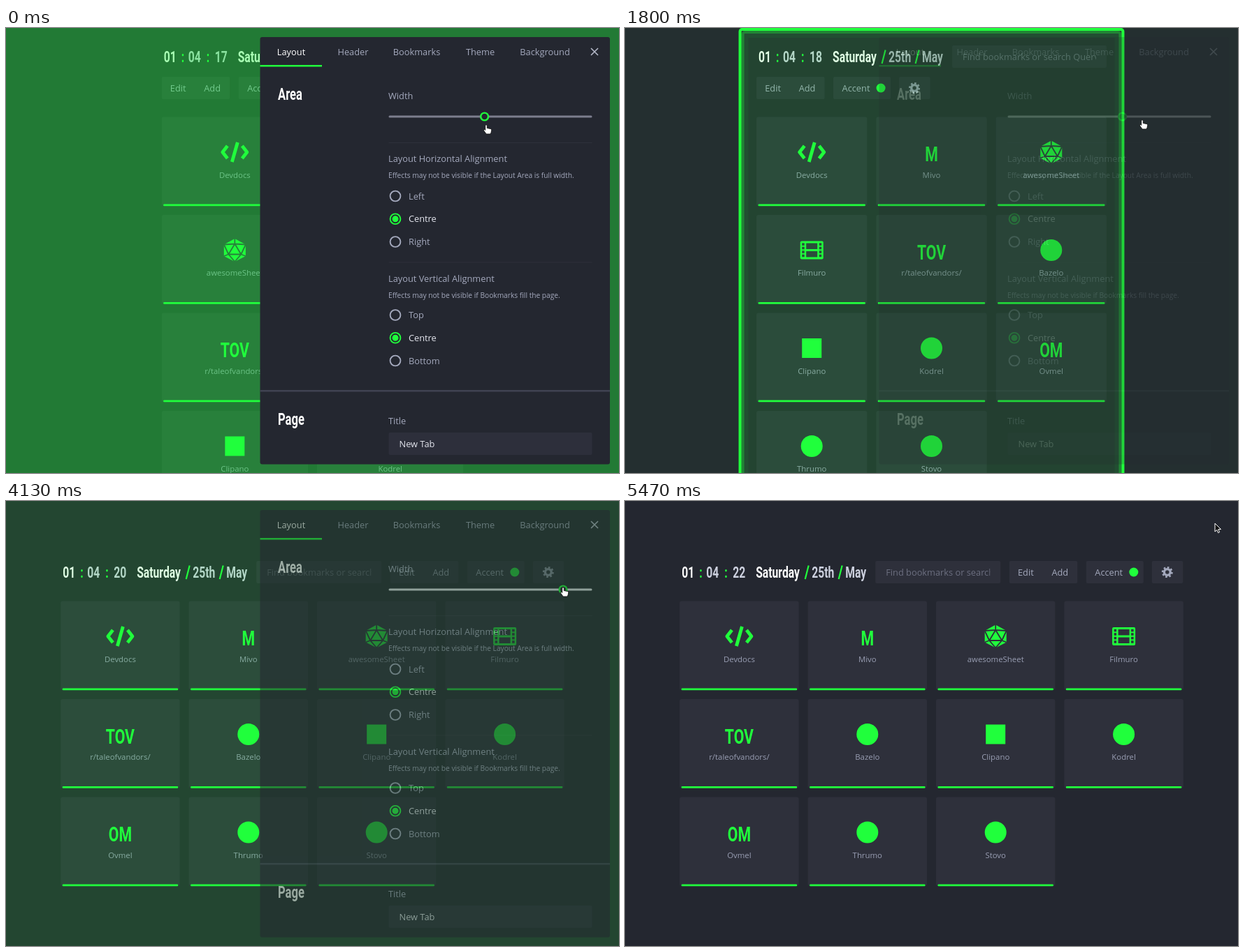
These frames come from a looping animation (877x638 px, 5540 ms). An HTML page:

```html
<!DOCTYPE html>
<html lang="en">
<head>
<meta charset="utf-8">
<title>Layout settings</title>
<style>
  html, body { margin: 0; width: 100%; height: 100%; overflow: hidden; background: #242730; }
  svg { display: block; }
  text { font: 12.8px "Open Sans", sans-serif; fill: #a4a9bd; white-space: pre; }
  .mid { text-anchor: middle; }
  .label { font-size: 11.4px; fill: #999eb3; }
  .small { font-size: 10.2px; }
  .bright { fill: #e4e6ee; }
  .hint { fill: #6c6f80; }
  .display { font: 600 21.8px Roboto, sans-serif; fill: #ccd0de; }
  .heading { font-size: 23px; fill: #fff; }
  .strong { fill: #fff; }
  .accent { fill: #20ff3c; }
  .mono { font-size: 29.5px; text-anchor: middle; fill: #20ff3c; }
</style>
</head>
<body>
<svg id="stage" width="877" height="638" viewBox="0 0 877 638"></svg>
<script>
const W = 877, H = 638, LOOP = 5540, FRAME = 200 / 3;
const ACCENT = '#20ff3c', BASE = '#242730', CARD = '#2e303b';
const stage = document.getElementById('stage');

const rect = (x, y, w, h, fill, rx = 0, extra = '') =>
  `<rect x="${x}" y="${y}" width="${w}" height="${h}" rx="${rx}" fill="${fill}" ${extra}/>`;
const circle = (x, y, r, fill, extra = '') =>
  `<circle cx="${x}" cy="${y}" r="${r}" fill="${fill}" ${extra}/>`;
const path = (d, extra) => `<path d="${d}" ${extra}/>`;
const text = (x, y, str, cls = '') => `<text x="${x}" y="${y}" class="${cls}">${str}</text>`;
// One condensed cut for every heading
const display = (x, y, str, cls = '') =>
  `<text transform="translate(${x} ${y}) scale(.72 1)" class="display ${cls}">${str}</text>`;
const group = (body, opacity) => opacity > 0 ? `<g opacity="${opacity}">${body}</g>` : '';
const at = (x, y, body) => `<g transform="translate(${x} ${y})">${body}</g>`;

const progress = (t, from, to) => Math.min(1, Math.max(0, (t - from) / (to - from)));
const mix = (a, b, k) => a + (b - a) * k;

// Linear interpolation through [time, ...values] rows
function track(rows, t) {
  const next = rows.findIndex(row => row[0] > t);
  if (next < 0) return rows[rows.length - 1].slice(1);
  const a = rows[next - 1], b = rows[next], k = progress(t, a[0], b[0]);
  return a.slice(1).map((v, i) => mix(v, b[i + 1], k));
}

const SLIDER = [[0, 684.6], [1200, 684.6], [1800, 711.5], [2400, 764], [2950, 797]];
const POINTER = [[0, 687, 139], [600, 685, 130], [1200, 685, 129], [1800, 740, 132],
  [2400, 775, 130], [2950, 797, 124], [4250, 797, 124], [4760, 844, 33], [5150, 844, 32]];
const TICKS = [1270, 2150, 3000, 4330, 5440];
const PRESS = 650, RELEASE = 3990, LEAVE = 4300, CLOSE = 5130;

const mono = str => display(0, 13, str, 'mono');
const disc = circle(0, 0, 15.5, ACCENT);
const icons = {
  code: path('M-10.5-9L-17.5 0-10.5 9M10.5-9L17.5 0 10.5 9M4-14L-4 14',
    `fill="none" stroke="${ACCENT}" stroke-width="4.8" stroke-linejoin="round"`),
  die: path('M0-16.5L15.5-8V8.5L0 16.5-15.5 8.5V-8Z', `fill="${ACCENT}"`) +
    path('M0-9L-9 6H9ZM0-17V-9L15.5-8 9 6 15.5 8.5M0-9L-15.5-8-9 6-15.5 8.5M-9 6L0 16.5 9 6',
      `fill="none" stroke="${CARD}" stroke-width="1.8" stroke-linejoin="round"`),
  film: rect(-16.5, -13, 33, 26, ACCENT, 2) + rect(-8, -10, 16, 8.5, CARD) + rect(-8, 1.5, 16, 8.5, CARD) +
    [-10.2, -4.8, .8, 6.2].map(y => rect(-14, y, 3.5, 3.6, CARD) + rect(10.5, y, 3.5, 3.6, CARD)).join('')
};
const BOOKMARKS = [
  ['Devdocs', icons.code], ['Mivo', mono('M')], ['awesomeSheet', icons.die], ['Filmuro', icons.film],
  ['r/taleofvandors/', mono('TOV')], ['Bazelo', disc], ['Clipano', rect(-14, -14, 28, 28, ACCENT)],
  ['Kodrel', disc], ['Ovmel', mono('OM')], ['Thrumo', disc], ['Stovo', disc]
];

function card([name, icon], x, y, w) {
  return at(x, y, rect(0, 0, w, 127.5, CARD, 3) + rect(2.5, 125, w - 5, 2.7, ACCENT, 1) +
    at(w / 2, 50.5, icon) + text(w / 2, 87, name, 'label mid'));
}

function clock(x, y, seconds) {
  const parts = [[3, '01', 'strong'], [28, ':', 'accent'], [38, '04'], [64, ':', 'accent'], [76, seconds],
    [109, 'Saturday', 'strong'], [189, '25th'], [237, 'May']];
  return at(x, y, parts.map(([dx, str, cls]) => display(dx, 0, str, cls)).join('') +
    path('M179.5 2.5L184.5-17M227.5 2.5L232.5-17', `stroke="${ACCENT}" stroke-width="2.2"`));
}

function buttons(x, y) {
  const gear = circle(0, 0, 4.4, 'none', 'stroke="#a4a9bd" stroke-width="3.4"') +
    circle(0, 0, 6.7, 'none', 'stroke="#a4a9bd" stroke-width="2.6" pathLength="16" stroke-dasharray="1"');
  return at(x, y, rect(0, 0, 97.5, 32, CARD, 2) + rect(110, 0, 82, 32, CARD, 2) + rect(204, 0, 44.5, 32, CARD, 2) +
    text(23.5, 20.5, 'Edit', 'mid') + text(72.5, 20.5, 'Add', 'mid') + text(122.5, 20.5, 'Accent') +
    circle(178, 16, 6.5, ACCENT) + at(226, 16, gear));
}

// Returns the page content and the outline of its area
function layout(sliderX, seconds) {
  const width = W * (.15 + .85 * (sliderX - 548) / 290);
  const columns = width < 525 ? 2 : width < 650 ? 3 : 4;
  const oneRow = width > 745;
  const rows = Math.ceil(BOOKMARKS.length / columns);
  const height = 107.5 + (oneRow ? 0 : 45) + rows * 140.5 - 13;
  const left = (W - width) / 2, top = Math.max(0, (H - height) / 2);
  const x = left + 25.5, y = top + 25, inner = width - 51;
  const searchWidth = inner - 280 - (oneRow ? 261.5 : 0);
  const cardTop = y + 57.5 + (oneRow ? 0 : 45);
  const cardWidth = (inner - 13 * (columns - 1)) / columns;

  const search = rect(x + 280, y, searchWidth, 32, CARD, 2) +
    `<svg x="${x + 295}" y="${y}" width="${searchWidth - 30}" height="32">` +
    text(0, 20.5, 'Find bookmarks or search Querva', 'hint') + '</svg>';
  const cards = BOOKMARKS.map((bookmark, i) =>
    card(bookmark, x + i % columns * (cardWidth + 13), cardTop + Math.floor(i / columns) * 140.5, cardWidth));
  const content = clock(x, y + 23.5, seconds) + search +
    (oneRow ? buttons(x + inner - 249, y) : buttons(x, y + 45)) + cards.join('');

  const ring = (inset, size, opacity) => rect(left + inset, top + inset, width - 2 * inset, height - 2 * inset,
    'none', 3, `stroke="${ACCENT}" stroke-width="${size}" stroke-opacity="${opacity}"`);
  const outline = rect(left, top, width, height, ACCENT, 4, 'fill-opacity=".1"') +
    ring(9, 10, .05) + ring(6, 4, .3) + ring(2, 4, 1);
  return { content, outline };
}

function radios(y, names) {
  return names.map((name, i) => {
    const on = i === 1, cy = y + i * 32.75;
    return circle(557, cy, 7.4, 'none', `stroke="${on ? ACCENT : '#a4a9bd'}" stroke-width="1.9"`) +
      (on ? circle(557, cy, 4.5, ACCENT) : '') + text(576, cy + 4.7, name, on ? 'bright' : '');
  }).join('');
}

function panel(sliderX, dragging, hoverClose) {
  const tabs = [['Layout', 408], ['Header', 496.5], ['Bookmarks', 587.5], ['Theme', 678.5], ['Background', 771]];
  const note = 'Effects may not be visible if ';
  return rect(363.5, 13, 500.5, 612.5, BASE, 3) +
    tabs.map(([name, x], i) => text(x, 39, name, i ? 'mid' : 'mid strong')).join('') +
    rect(363.5, 53, 88.5, 2.5, ACCENT) +
    (hoverClose ? rect(819.5, 13, 44.5, 42.5, '#464858') + rect(819.5, 53, 44.5, 2.5, ACCENT) : '') +
    path('M837 29l10 10m0-10l-10 10', `stroke="${hoverClose ? '#fff' : '#b4b8c8'}" stroke-width="1.6"`) +
    display(389, 103, 'Area', 'heading') + text(547, 102, 'Width') +
    rect(547.5, 125.5, 291, 3, dragging ? '#eceef4' : '#7c7e8e', 1.5) +
    circle(sliderX, 127, 5.4, BASE, `stroke="${ACCENT}" stroke-width="2.4"`) +
    rect(547.5, 164, 291, 1, '#2e313b') +
    text(547, 192, 'Layout Horizontal Alignment') +
    text(547, 215, note + 'the Layout Area is full width.', 'small') +
    radios(241, ['Left', 'Centre', 'Right']) +
    rect(547.5, 335.5, 291, 1, '#2e313b') +
    text(547, 363.5, 'Layout Vertical Alignment') +
    text(547, 386.5, note + 'Bookmarks fill the page.', 'small') +
    radios(411.5, ['Top', 'Centre', 'Bottom']) +
    rect(363.5, 519, 500.5, 2.5, '#404352') +
    display(389, 569, 'Page', 'heading') + text(547, 567.5, 'Title') +
    rect(547.5, 580, 291, 32, '#2d2f3b', 2) + text(562.5, 600.5, 'New Tab', 'bright');
}

function pointer(t) {
  const [x, y] = track(POINTER, t);
  const hand = path('M-1.3 1a1.3 1.3 0 0 1 2.6 0V4.5l5 1q1.6.4 1.4 2l-.6 3.2-1 2.3h-6l-3.6-5q-.7-1.6 1-1.6l1.2 1Z',
    'fill="#fff" stroke="#111" stroke-width=".9"');
  const arrow = path('M0 0V12l2.8-2.6 1.8 4.2 2-.9-1.8-4.1h3.8Z', 'fill="#111" stroke="#fff"');
  return at(x, y, t < CLOSE + 60 ? hand : arrow);
}

function draw(t) {
  const [sliderX] = track(SLIDER, t);
  const pressed = progress(t, PRESS, PRESS + 240), released = progress(t, RELEASE, RELEASE + 340);
  const open = 1 - progress(t, CLOSE, CLOSE + 250);
  const shown = t < RELEASE ? 1 - pressed : released;
  const page = layout(sliderX, 17 + TICKS.filter(tick => t >= tick).length);
  stage.innerHTML = rect(0, 0, W, H, BASE) + page.content +
    rect(0, 0, W, H, ACCENT, 0, `opacity="${.385 * open * mix(.1, 1, shown ** 1.4)}"`) +
    group(page.outline, t < RELEASE ? pressed : 0) +
    group(panel(sliderX, t > PRESS && t < LEAVE, t > 4720), open * mix(.2, 1, shown)) +
    pointer(t);
}

// Frames start at multiples of FRAME, rounded to 10 ms
function tick() {
  const t = performance.now() % LOOP;
  draw(Math.floor((t + 5) / FRAME) * FRAME);
  requestAnimationFrame(tick);
}
tick();
</script>
</body>
</html>
```
